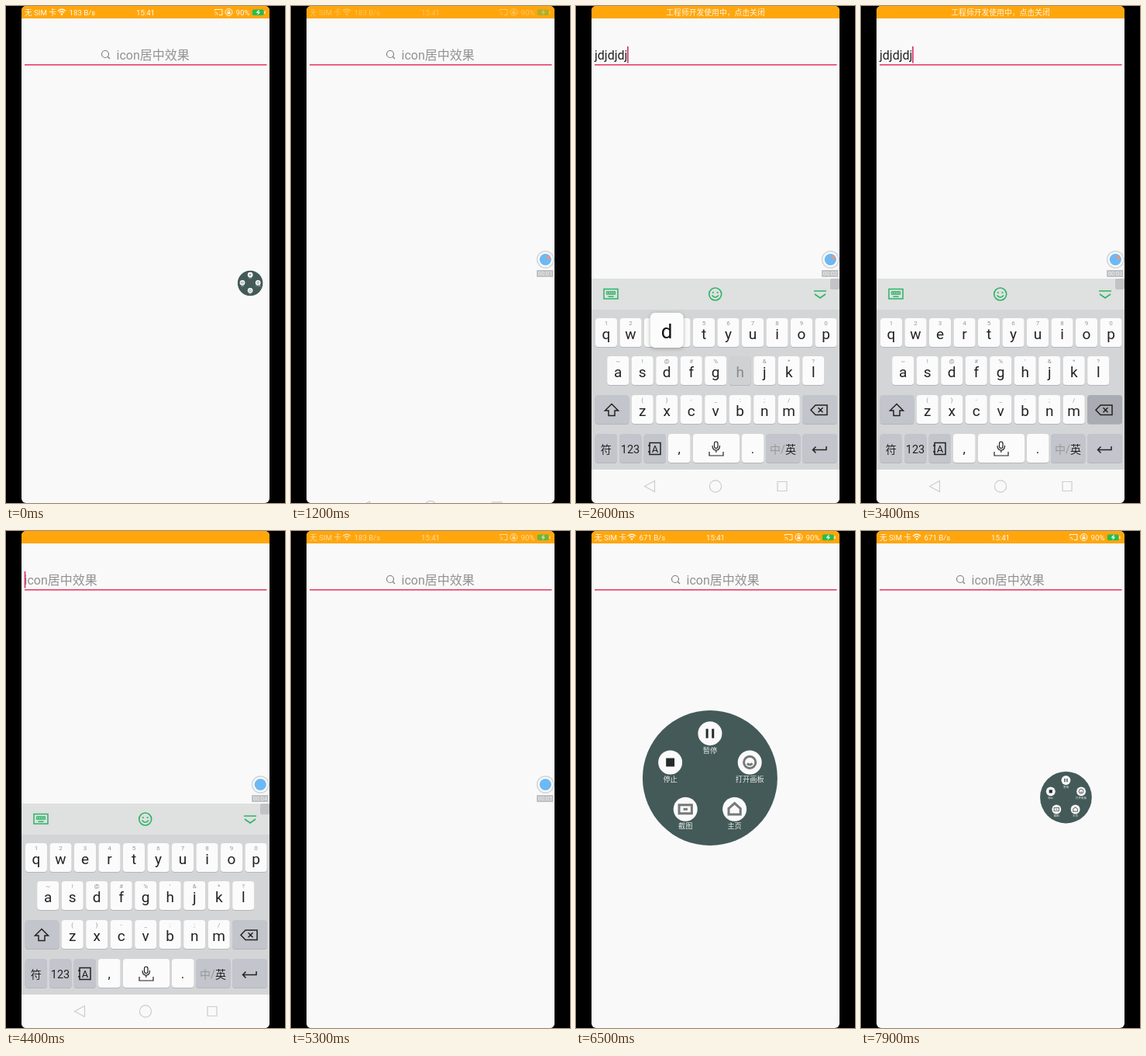
These frames come from a looping animation (360 by 640 pixels, 8000 ms). An HTML page with a canvas:

```html
<!DOCTYPE html>
<html lang="zh">
<head>
<meta charset="utf-8">
<style>
  html, body { margin: 0; width: 100%; height: 100%; overflow: hidden; background: #000; }
  canvas { display: block; }
</style>
</head>
<body>
<canvas id="stage" width="360" height="640"></canvas>
<script>
const ctx = document.getElementById('stage').getContext('2d');
const FONT = 'Roboto, "Noto Sans CJK SC", "Noto Sans CJK", sans-serif';
const LOOP = 8000, STEP = 100;
const BAR = '#ffa60d', PAGE = '#f9f9f9', INK = '#222', GREEN = '#2bb566';
const HINT = 'icon居中效果', TYPED = 'jdjdjdjdh';

const clamp = v => Math.max(0, Math.min(1, v));
const ramp = (t, from, to) => clamp((t - from) / (to - from));
const mix = (a, b, p) => a + (b - a) * p;
const easeOut = p => 1 - (1 - p) ** 2;
const overshoot = p => 1 + (p - 1) ** 2 * (2.2 * (p - 1) + 1.2);
const between = (t, from, to) => t >= from && t < to;

function text(str, x, y, size, color, align = 'left') {
  ctx.font = `${size}px ${FONT}`;
  ctx.textAlign = align;
  ctx.fillStyle = color;
  ctx.fillText(str, x, y);
}
function box(x, y, w, h, color, radius = 0) {
  ctx.fillStyle = color;
  ctx.beginPath();
  ctx.roundRect(x, y, w, h, radius);
  ctx.fill();
}
function disc(x, y, r, color) {
  ctx.fillStyle = color;
  ctx.beginPath();
  ctx.arc(x, y, r, 0, 7);
  ctx.fill();
}
function ring(x, y, r, color, width = 1) {
  ctx.strokeStyle = color;
  ctx.lineWidth = width;
  ctx.beginPath();
  ctx.arc(x, y, r, 0, 7);
  ctx.stroke();
}
function line(path, color, width = 1) {
  ctx.strokeStyle = color;
  ctx.lineWidth = width;
  ctx.stroke(new Path2D(path));
}
function layer(draw, { alpha = 1, dy = 0 }) {
  ctx.save();
  ctx.globalAlpha *= alpha;
  ctx.translate(0, dy);
  draw();
  ctx.restore();
}

// Status bar
function drawStatus(t) {
  const white = '#fff8ea';
  text('无 SIM 卡', 24, 12, 9.7, white);
  line('M67 6.5Q72 2 77 6.5M69 8.5Q72 5.5 75 8.5', white, 1.3);
  disc(72, 10.5, 1.3, white);
  text(t < 5600 ? '183 B/s' : '671 B/s', 81.5, 12, 9.7, white);
  text('15:41', 180, 12, 9.7, white, 'center');
  line('M269.5 6V4.5H279V11.5H275M269.5 8Q273 8 273 11.5M269.5 10.5L270.5 11.5', white);
  ring(287.5, 8, 4.5, white);
  box(285.5, 7.5, 4, 3, white);
  line('M286.3 7.5V5.5H288.7V7.5', white, .8);
  text('90%', 296.5, 11.5, 9.7, white);
  box(318, 4.5, 14.5, 7.5, '#24bd4e', 1.5);
  box(333.3, 6.5, 1.2, 3.5, white);
  line('M326.5 5.5L323.8 8.3H327L324.6 11', '#fff', 1.1);
}

// Search field
function drawField(t, length) {
  const focused = between(t, 1300, 5000);
  if (length) text(TYPED.slice(0, length), 24, 69, 16, INK);
  else text(HINT, focused ? 23.5 : 142.5, 68.5, 16, '#929292');
  if (!focused) {
    ring(128, 62, 4.5, '#808080', 1.2);
    line('M131.3 65.3L134 68', '#808080', 1.3);
  }
  box(24, 75, 312.5, 1.6, '#e5345c');
  if (focused && !between(t, 1700, 2000) && !between(t, 4900, 5000)) {
    ctx.font = `16px ${FONT}`;
    const width = ctx.measureText(TYPED.slice(0, length)).width;
    box(23.7 + width, 52, 1.6, 21.5, '#d82a62');
  }
}

// Keyboard
const PITCH = 31.5;
const ROWS = [
  { letters: 'qwertyuiop', marks: '1234567890', x: 39, y: 402 },
  { letters: 'asdfghjkl', marks: "~!@#%'&*?", x: 54.2, y: 451 },
  { letters: 'zxcvbnm', marks: '()-_:;/', x: 85.7, y: 501 },
];
const keyX = (row, i) => row.x + PITCH * i;

function drawKey(x, y, w, color) {
  box(x, y + 1, w, 37, '#b4b6ba', 4);
  box(x, y, w, 37, color, 4);
}

function drawKeyboard(popup, pressed, deleting) {
  const white = '#fbfbfb', dull = '#c2c5cb', soft = '#989898';
  box(20, 351, 320, 40, '#dfe0e0');
  box(20, 391, 320, 206, '#d4d5d7');

  line('M36 364.5H54V377H36ZM39 368H51M39 371H51M41.5 374.3H48.5', GREEN, 1.5);
  ctx.setLineDash([1.6, 1.2]);
  line('M38.5 369.5H52', GREEN, 1.2);
  ctx.setLineDash([]);
  ring(179.7, 371, 8, GREEN, 1.6);
  disc(176.8, 369, 1.1, GREEN);
  disc(182.6, 369, 1.1, GREEN);
  line('M175.5 372.5Q179.7 378 184 372.5', GREEN, 1.5);
  line('M307 367H323M308 371L315 376L322 371', GREEN, 1.6);

  for (const row of ROWS) {
    [...row.letters].forEach((letter, i) => {
      const x = keyX(row, i), down = letter === pressed;
      drawKey(x - 14, row.y, 28, down ? '#d0d1d3' : white);
      if (!down) text(row.marks[i], x, row.y + 8.5, 8, soft, 'center');
      text(letter, x, row.y + 27, 19, down ? '#8a8a8a' : INK, 'center');
    });
  }

  drawKey(24.5, 501, 44, dull);
  line('M46 512.5L54.5 521H50V527.5H42V521H37.5Z', INK, 1.5);
  drawKey(292, 501, 45, deleting ? '#a9acb2' : dull);
  line('M309 514H324V526.5H309L303 520.2ZM312.5 517.3L318.5 523.3M318.5 517.3L312.5 523.3', INK, 1.5);

  drawKey(24.5, 551, 28.5, dull);
  text('符', 38.7, 576, 14, INK, 'center');
  drawKey(56, 551, 28.5, dull);
  text('123', 70, 576, 14.5, INK, 'center');
  drawKey(87.5, 551, 28.5, dull);
  line('M95 562.5H109V577.5H95ZM93 566H96M93 574H96', INK, 1.5);
  text('A', 102, 575, 13, INK, 'center');
  drawKey(119, 551, 28.5, white);
  text(',', 133.2, 576, 17, INK, 'center');
  drawKey(151, 551, 60, white);
  line('M178.5 563.5Q178.5 561 180.8 561Q183 561 183 563.5V567Q183 569.5 180.8 569.5Q178.5 569.5 178.5 567Z', INK, 1.2);
  line('M176 566Q176 572 180.8 572Q185.5 572 185.5 566M180.8 572V575M172 574V579H190V574', INK, 1.2);
  drawKey(214, 551, 28.5, white);
  text('.', 228, 576, 17, INK, 'center');
  drawKey(245, 551, 44.5, dull);
  text('中/', 250, 576, 14, soft);
  text('英', 277, 576, 14, INK, 'center');
  drawKey(292, 551, 45, dull);
  line('M323 567V571.5H305.5M309.5 567.5L305.5 571.5L309.5 575.5', INK, 1.5);

  box(328, 351, 12, 14, '#c3c3c5', 2);

  if (popup) {
    const row = ROWS.find(r => r.letters.includes(popup));
    const x = keyX(row, row.letters.indexOf(popup));
    ctx.save();
    ctx.shadowColor = '#6668';
    ctx.shadowBlur = 4;
    ctx.shadowOffsetY = 1;
    box(x - 21.5, row.y - 56, 43, 45, '#fcfcfc', 6);
    ctx.restore();
    text(popup, x, row.y - 23, 26, '#111', 'center');
  }
}

function drawNavigation() {
  const grey = '#cdcdd0';
  box(20, 597, 320, 43, PAGE);
  line('M88.5 618.5L101.5 611.5V625.5Z', grey, 1.2);
  ring(180, 618.5, 7.6, grey, 1.2);
  line('M260 612.5H272V624.5H260Z', grey, 1.2);
}

// Floating recorder and its menu
function drawRecorder(t) {
  const lit = between(t, 300, 1700) || between(t, 2500, 3800) || t >= 5700;
  const seconds = 1 + [1500, 3200, 4200, 5000].filter(at => t >= at).length;
  disc(328.3, 326.5, 11.5, '#d6d8da');
  disc(328.3, 326.5, 9.8, '#fbfbfb');
  disc(328.3, 326.5, 7.6, '#6db9f5');
  if (lit) {
    ctx.fillStyle = '#e39a80';
    ctx.fill(new Path2D('M328.5 322L332 320.8L334.8 324.5L332 327Z'));
  }
  box(317, 340, 21.5, 9, '#bfc1c4', 1);
  text('00:0' + seconds, 327.8, 347.3, 7.5, '#f4f4f4', 'center');
}

const GLYPHS = [
  'M-1.4 -2.2V2.2M1.4 -2.2V2.2',
  'M-2.8 0A2.8 2.8 0 1 0 2.8 0A2.8 2.8 0 1 0 -2.8 0M-1.2 .5Q0 1.8 1.2 .5',
  'M-2.8 -.3L0 -2.8L2.8 -.3V2.5H-2.8Z',
  'M-3 -2H3V2H-3ZM-1 0H1',
  'M-1 -1H1V1H-1Z',
];
const LABELS = ['暂停', '打开画板', '主页', '截图', '停止'];

// open runs from 0, docked at the right edge, to 1, in the middle of the screen
function drawMenu(open, count) {
  const x = mix(332, 180, open), y = mix(361.5, 320, open);
  const r = 14 + 68 * open ** 1.55;
  disc(x, y, r, '#435a58');
  for (let i = 0; i < count; i++) {
    const angle = (i / count - .25) * 2 * Math.PI;
    ctx.save();
    ctx.translate(x + Math.cos(angle) * r * .62, y - r * .04 + Math.sin(angle) * r * .62);
    ctx.scale(r / 32, r / 32);
    disc(0, 0, count === 5 ? 5.7 : 6.6, '#fafafa');
    line(GLYPHS[i], i % 4 ? '#75797a' : '#252b2b', i === 4 ? 2 : 1.1);
    text(LABELS[i], 0, 9.3, 3.4, '#e6eaea', 'center');
    ctx.restore();
  }
}

function drawFloating(t) {
  const closing = start => (1 - ramp(t, start, start + 300)) ** 2;
  if (t < 200) drawMenu(closing(-200), 4);
  else if (t < 6100) layer(() => drawRecorder(t), { alpha: ramp(t, 100, 400) });
  else drawMenu(overshoot(ramp(t, 6000, 6700)) * closing(7800), 5);
}

function typedLength(t) {
  if (t < 2900) return Math.round(9 * ramp(t, 1900, 2800));
  if (t < 4000) return 9 - Math.round(3 * ramp(t, 3100, 3500));
  return Math.round(6 * (1 - ramp(t, 3900, 4400)));
}

function draw(t) {
  const length = typedLength(t);
  const typing = between(t, 2000, 2800);
  const deleting = between(t, 3100, 3500) || between(t, 4000, 4400);
  const keyboard = easeOut(ramp(t, 1200, 1500)) * (1 - ramp(t, 4800, 5200) ** 2);
  const navigation = ramp(t, 1100, 1360) * (1 - ramp(t, 5000, 5400));
  const status = t < 3000 ? 1 - ramp(t, 800, 1420) : ramp(t, 4900, 5500);
  const notice = t < 3000 ? ramp(t, 1700, 2500) : 1 - ramp(t, 3900, 4400);

  ctx.fillStyle = '#000';
  ctx.fillRect(0, 0, 360, 640);
  ctx.save();
  ctx.beginPath();
  ctx.roundRect(20, 0, 320, 640, 6);
  ctx.clip();
  box(20, 0, 320, 640, PAGE);
  box(20, 0, 320, 16, BAR);
  layer(() => drawStatus(t), { alpha: status });
  layer(() => text('工程师开发使用中，点击关闭', 180, 12, 9.8, '#fff4e0', 'center'), { alpha: notice });
  drawField(t, length);
  if (keyboard > 0) {
    layer(() => drawKeyboard(typing && TYPED[length], typing && TYPED[length + 1], deleting),
      { dy: 289 * (1 - keyboard) });
  }
  if (navigation > 0) layer(drawNavigation, { dy: 43 * (1 - navigation) });
  ctx.restore();
  drawFloating(t);
}

function frame() {
  const t = performance.now() % LOOP;
  draw(Math.floor(t / STEP) * STEP);
  requestAnimationFrame(frame);
}
frame();
</script>
</body>
</html>
```
